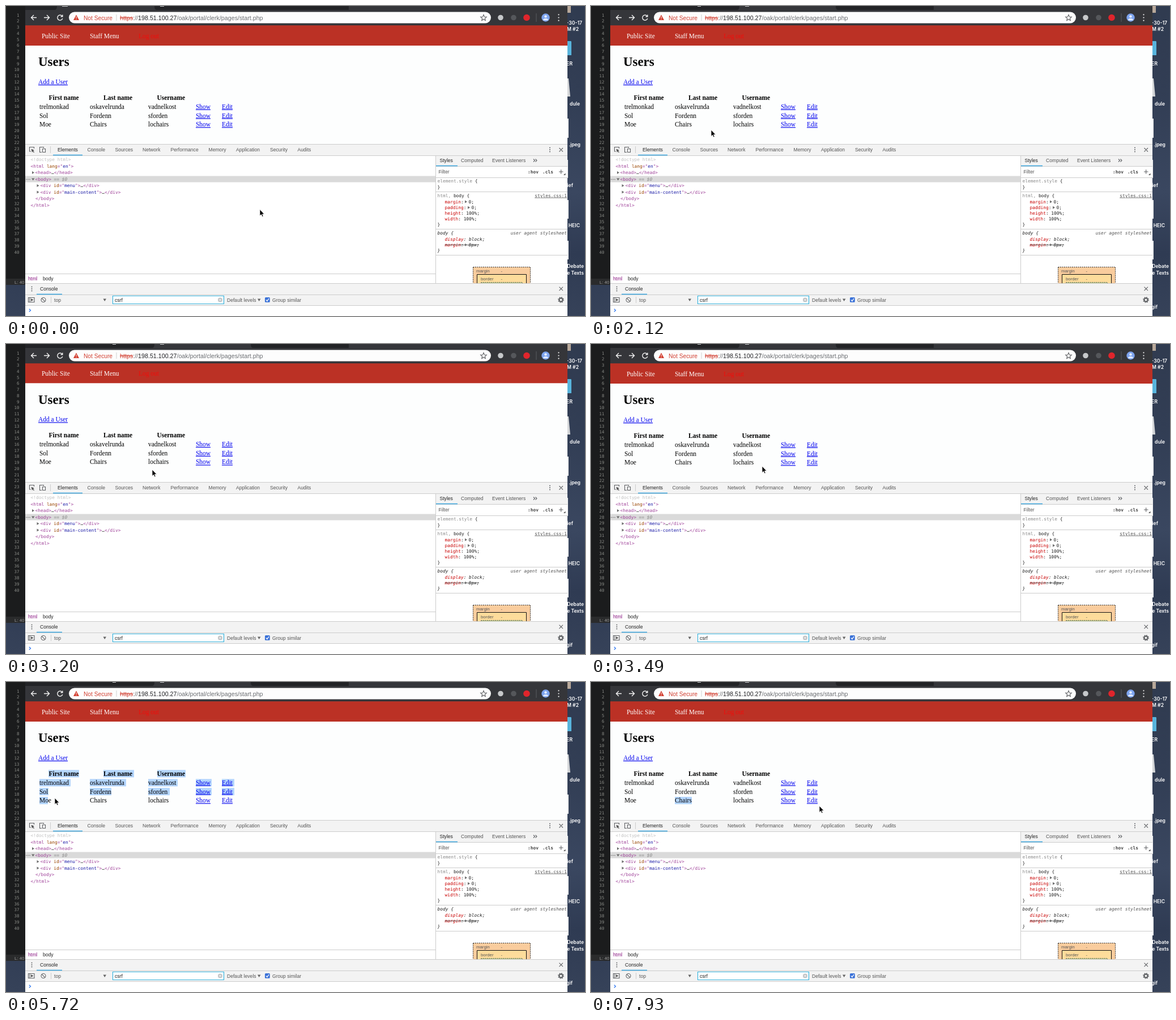
An HTML page for the animation above (8 s loop, 1022x548 px).

```html
<!DOCTYPE html>
<html lang="en">
<head>
<meta charset="utf-8">
<title>Users</title>
<style>
html, body { margin: 0; width: 100%; height: 100%; overflow: hidden; background: #1c1d1f; }
svg { display: block; width: 100vw; height: 100vh; }
text { white-space: pre; }
.ui { font: 8.6px "Liberation Sans", Arial, sans-serif; fill: #555; }
.ui .on { fill: #222; }
.ui .tag { fill: #881280; }
.url { font: 10.7px "Liberation Sans", Arial, sans-serif; fill: #6c6f73; }
.mono { font: 7.86px "DejaVu Sans Mono", monospace; fill: #222; }
.web { font: 11.43px "Liberation Serif", Times, serif; fill: #000; }
.web .link { fill: #00e; text-decoration: underline; }
.web .head { font-weight: bold; }
.gutter { font: 7.4px "DejaVu Sans Mono", monospace; fill: #8b8d88; text-anchor: end; }
.desk { font: 600 8.6px Inter, "Liberation Sans", sans-serif; fill: #fff; text-anchor: end; }
.tag { fill: #a0439a; }
.name { fill: #994500; }
.value { fill: #1a1aa6; }
.prop { fill: #c80000; }
.dim { fill: #888; }
.line { stroke: #ccc; fill: none; }
.icon { stroke: #5f6164; fill: none; stroke-width: 1.1; }
.light { stroke: #f1f1f1; fill: none; stroke-width: 1.4; }
</style>
</head>
<body>
<svg viewBox="0 0 1022 548">
  <defs>
    <linearGradient id="sky" x2="0" y2="1">
      <stop offset="0" stop-color="#303b50"/><stop offset=".3" stop-color="#323e55"/>
      <stop offset=".6" stop-color="#3a4760"/><stop offset=".8" stop-color="#2f3b53"/>
      <stop offset="1" stop-color="#364259"/>
    </linearGradient>
    <clipPath id="view"><path d="M34 34.300H991V244H34Z"/></clipPath>
    <clipPath id="styles"><path d="M759 264H991V490H759Z"/></clipPath>
  </defs>

  <!-- desktop -->
  <rect width="1022" height="548" fill="url(#sky)"/>
  <path d="M985 0H997V12H985Z" fill="#b8a89a"/>
  <path d="M985 62H997Q998 62 998 64V87H985Z" fill="#58b4dc"/>
  <path d="M985 128H993L996 160H985Z" fill="#d4d6d8"/>
  <path d="M985 199H993V233H985ZM985 272H992V304H985ZM985 343H993V376H985ZM985 415H993V448H985Z" fill="#eceeef"/>
  <g id="labels" class="desk"></g>

  <!-- editor -->
  <path d="M0 0H34V493H0Z" fill="#1b1c1d"/>
  <path d="M0 482H34V493H0Z" fill="#2a2b2c"/>
  <g id="gutter" class="gutter"></g>
  <text x="15" y="491" class="ui" style="font-size:7.8px;fill:#999">L: 40</text>

  <!-- browser bar -->
  <path d="M34 0H991V35H34Z" fill="#35363a"/>
  <path d="M34 0H605V7H34Z" fill="#222326"/>
  <path id="tab" fill="#35363a"/>
  <path id="favicons" fill="#c9cbcd"/>
  <path class="light" d="M54 20.500H44.500M49 16L44.500 20.500 49 25M67 20.500H76.500M72 16L76.500 20.500 72 25M99.200 18A4.600 4.600 0 1 0 99.800 22M99.800 15.500V18.800H96.500"/>
  <rect x="111" y="10.500" width="745" height="20" rx="10" fill="#fdfdfd"/>
  <path d="M124 15.500L129 25H119Z" fill="#d23f31"/>
  <path d="M124 18.500V21.800M124 22.800V24" stroke="#fff"/>
  <text x="137" y="24.500" class="url" style="font-size:10.2px;fill:#d23f31">Not Secure</text>
  <path d="M195 15V26" stroke="#d0d0d0"/>
  <text x="201" y="24.500" class="url"><tspan fill="#d23f31" text-decoration="line-through">https</tspan>://<tspan fill="#202124">198.51.100.27</tspan>/oak/portal/clerk/pages/start.php</text>
  <path class="icon" d="M843 15.500L844.500 19 848.300 19.300 845.400 21.800 846.300 25.500 843 23.500 839.700 25.500 840.600 21.800 837.700 19.300 841.500 19Z"/>
  <circle cx="873" cy="20.500" r="4.800" fill="#c6c8ca"/>
  <circle cx="896" cy="20.500" r="4.800" fill="#55575b"/>
  <circle cx="919" cy="20.500" r="5.800" fill="#e0252c"/>
  <path d="M936 13V28" stroke="#5b5d61"/>
  <circle cx="952.500" cy="20.500" r="7.200" fill="#7ea4ee"/>
  <circle cx="952.500" cy="18.500" r="2.300" fill="#e4edff"/>
  <path d="M948 25.200Q948 22 952.500 22T957 25.200Z" fill="#e4edff"/>
  <path d="M975.500 15.300h.01M975.500 20.500h.01M975.500 25.700h.01" stroke="#f1f1f1" stroke-width="2.200" stroke-linecap="round"/>

  <!-- page -->
  <path d="M34 35H991V244H34Z" fill="#fdfefe"/>
  <g clip-path="url(#view)">
    <g id="page" class="web">
      <path d="M34 34H991V70H34Z" fill="#bb3125"/>
      <g fill="#fff"><text x="63" y="57">Public Site</text><text x="148" y="57">Staff Menu</text></g>
      <text x="234" y="57" fill="#f00d0b">Log out</text>
      <text x="57" y="106.300" class="head" font-size="22.860">Users</text>
      <text x="57" y="138" class="link">Add a User</text>
      <path id="selection" fill="#b3d5fd"/>
      <g id="table"></g>
    </g>
  </g>

  <!-- inspector -->
  <path d="M34 244H991V548H34Z" fill="#fff"/>
  <path d="M34 244H991V264H34ZM759 264H991V283H759ZM34 490H991V529H34Z" fill="#f3f3f3"/>
  <path d="M34 300.500H758V311.500H34Z" fill="#dadada"/>
  <path class="line" d="M34 244.500H991M34 264.500H991M758.500 264V490M759 283.500H991M759 303.500H991M759 328.500H991M759 394.500H991M759 440.500H991M34 473.500H758M34 490.500H991M34 510.500H991M34 529.500H991M78.500 248V260M79.500 514V525"/>
  <path d="M83 263.500H135M759 282.500H797M54 509.500H99" stroke="#3ba7e0" stroke-width="1.400"/>
  <path class="icon" d="M44 257H41.500V249.500H49.500V252M63 258.500H59.500V249.500H66.500V251M64.500 252.500H69.500V258.500H64.500Z"/>
  <path d="M44.500 252.500L50 255 48 256 50 258.500 49 259.300 47 257 46 259Z" fill="#555"/>
  <path d="M960 250.500h.01M960 254h.01M960 257.500h.01M45.500 496.500h.01M45.500 500h.01M45.500 503.500h.01" stroke="#5f6164" stroke-width="2" stroke-linecap="round"/>
  <path class="icon" d="M976.500 251L983 257.500M983 251L976.500 257.500M976.500 496.700L983 503.200M983 496.700L976.500 503.200M931 270.500L933.500 273 931 275.500M934.500 270.500L937 273 934.500 275.500M976 293H983.500M979.700 289.200V296.700"/>
  <path d="M987.500 295.500V299H984Z" fill="#555"/>

  <g class="mono">
    <text x="43.500" y="274.200" fill="#c0c0c0">&lt;!doctype html&gt;</text>
    <text x="43.500" y="285.700" class="tag">&lt;html <tspan class="name">lang</tspan>="<tspan class="value">en</tspan>"&gt;</text>
    <text x="51.500" y="297.200" class="tag">&lt;head&gt;<tspan fill="#222">…</tspan>&lt;/head&gt;</text>
    <text x="51.500" y="308.700" class="tag">&lt;body&gt;<tspan class="dim" font-style="italic"> == $0</tspan></text>
    <text x="60.500" y="320.200" class="tag">&lt;div <tspan class="name">id</tspan>="<tspan class="value">menu</tspan>"&gt;<tspan fill="#222">…</tspan>&lt;/div&gt;</text>
    <text x="60.500" y="331.700" class="tag">&lt;div <tspan class="name">id</tspan>="<tspan class="value">main-content</tspan>"&gt;<tspan fill="#222">…</tspan>&lt;/div&gt;</text>
    <text x="52" y="343.200" class="tag">&lt;/body&gt;</text>
    <text x="43.500" y="354.700" class="tag">&lt;/html&gt;</text>
    <path d="M46 292L50 294.500 46 297ZM45 304.500H50.500L47.700 308.500ZM54.500 315L58.500 317.500 54.500 320ZM54.500 326.500L58.500 329 54.500 331.500Z" fill="#6e6e6e"/>
    <path d="M36 306.500h.01M39 306.500h.01M42 306.500h.01" stroke="#666" stroke-width="1.500" stroke-linecap="round"/>
  </g>

  <g class="mono" clip-path="url(#styles)">
    <text x="921" y="295.700" font-weight="bold" fill="#444">:hov</text>
    <text x="947" y="295.700" font-weight="bold" fill="#444">.cls</text>
    <text x="761.500" y="311.500"><tspan class="dim">element.style</tspan> {</text>
    <text x="761.500" y="322.500">}</text>
    <text x="761.500" y="337.700"><tspan class="dim">html, </tspan>body {</text>
    <text x="990" y="337.700" text-anchor="end" fill="#555" text-decoration="underline">styles.css:1</text>
    <text x="774.500" y="348.500"><tspan class="prop">margin</tspan>:<tspan x="816.500">0;</tspan></text>
    <text x="774.500" y="358.700"><tspan class="prop">padding</tspan>:<tspan x="821.500">0;</tspan></text>
    <text x="774.500" y="368.900"><tspan class="prop">height</tspan>: 100%;</text>
    <text x="774.500" y="379.100"><tspan class="prop">width</tspan>: 100%;</text>
    <text x="761.500" y="388.700">}</text>
    <g font-style="italic">
      <text x="761.500" y="403.500">body {</text>
      <text x="990" y="403.500" text-anchor="end" fill="#555">user agent stylesheet</text>
      <text x="774.500" y="414.700"><tspan class="prop">display</tspan>: block;</text>
      <text x="774.500" y="424.900"><tspan class="prop">margin</tspan>:<tspan x="816.500">8px;</tspan></text>
      <text x="761.500" y="435">}</text>
    </g>
    <path d="M774.500 422.300H835" stroke="#444" stroke-width=".8"/>
    <path d="M810 343.500L814 346 810 348.500ZM815 353.700L819 356.200 815 358.700ZM810 419.700L814 422.200 810 424.700Z" fill="#6e6e6e"/>
    <path d="M824.500 461.500H925.500V500H824.500Z" fill="#f9cc9d" stroke="#222" stroke-dasharray="2 1.500"/>
    <path d="M831.500 474.500H918.500V500H831.500Z" fill="#fddc9b" stroke="#111"/>
    <path d="M838.500 488.500H911.500V500H838.500Z" fill="#c2d08a" stroke="#666" stroke-dasharray="2 1.500"/>
    <g class="ui" style="font-size:7.8px"><text x="830" y="470.700">margin</text><text x="873.500" y="470.700">-</text><text x="838" y="484.700">border</text><text x="873.500" y="484.700">-</text></g>
  </g>

  <!-- console -->
  <path class="icon" d="M39.500 515.500H50V523.500H39.500ZM42 515.500V523.500"/>
  <path d="M44 517L48.500 519.500 44 522Z" fill="#555"/>
  <path class="icon" d="M62 519.500a4 4 0 1 0 8 0a4 4 0 1 0 -8 0M63.200 516.700L68.800 522.300"/>
  <path d="M171.500 517.500H177L174.200 522ZM444 517.500H449.500L446.700 522Z" fill="#666"/>
  <path d="M188.500 512.500H384.500V526.500H188.500Z" fill="#fff" stroke="#36b2dc" stroke-width="1.200"/>
  <circle cx="378" cy="519.500" r="4" fill="#c4c6c8"/>
  <path d="M376.500 518L379.500 521M379.500 518L376.500 521" stroke="#fff"/>
  <rect x="457" y="515" width="8.800" height="8.800" rx="1.500" fill="#3b72d8"/>
  <path d="M459 519.500L461 521.600 464 517" fill="none" stroke="#fff" stroke-width="1.300"/>
  <circle cx="979.500" cy="519.500" r="3.100" fill="none" stroke="#5f6164" stroke-width="2.200"/>
  <circle cx="979.500" cy="519.500" r="4.700" fill="none" stroke="#5f6164" stroke-width="1.300" stroke-dasharray="1.846"/>
  <path d="M40.800 535.500L43.500 538 40.800 540.500" fill="none" stroke="#367cf1" stroke-width="1.300"/>
  <g id="captions" class="ui"></g>

  <path id="arrow" d="M0 0V11.500L2.600 9.100 4.300 13 6.200 12.200 4.500 8.400H8Z" fill="#000" stroke="#fff" stroke-width=".8"/>
  <path id="beam" d="M-3 -8Q0 -8 0 -6Q0 -8 3 -8M0 -6V6M-3 8Q0 8 0 6Q0 8 3 8" fill="none" stroke="#111"/>
</svg>
<script>
const $ = id => document.getElementById(id);
const columns = [59, 148, 251, 335, 381];
const rows = [181.7, 197.5, 213.2];
const cssPixel = 5 / 7;

function label(parent, x, y, content, className = "") {
  const node = document.createElementNS("http://www.w3.org/2000/svg", "text");
  node.setAttribute("x", x);
  node.setAttribute("y", y);
  node.setAttribute("class", className);
  node.textContent = content;
  return $(parent).appendChild(node);
}

for (let n = 1; n <= 40; n++) label("gutter", 23.5, 8 + n * 10.74, n);

[[1017, 33, "-30-17"], [1011, 44, "M #2"], [1000, 105, "ER"], [1013, 176, "dule"],
 [1014, 248, ".jpeg"], [1001, 320, "ief"], [1013, 391, "HEIC"], [1020, 463, "Debate"],
 [1020, 475, "e Texts"]].forEach(item => label("labels", ...item));
const newFile = label("labels", 1000, 535, "gif");

[[75.5, "First name"], [172, "Last name"], [266.5, "Username"]]
  .forEach(([x, title]) => label("table", x, 165.8, title, "head"));
[["trelmonkad", "oskavelrunda", "vadnelkost"], ["Sol", "Fordenn", "sforden"], ["Moe", "Chairs", "lochairs"]]
  .forEach((cells, r) => [...cells, "Show", "Edit"].forEach((cell, c) =>
    label("table", columns[c], rows[r], cell, c > 2 ? "link" : "")));

[[91, "Elements", "on"], [143.5, "Console"], [192.5, "Sources"], [241, "Network"], [290.5, "Performance"],
 [357.5, "Memory"], [406, "Application"], [466, "Security"], [514.5, "Audits"]]
  .forEach(([x, title, state]) => label("captions", x, 257, title, state));
[[765.5, 276.2, "Styles", "on"], [803, 276.2, "Computed"], [858, 276.2, "Event Listeners"],
 [763.5, 296, "Filter"], [39, 485, "html", "tag"], [65, 485, "body", "on"], [60, 503, "Console", "on"],
 [85, 522.6, "top"], [192, 522.6, "csrf", "on"], [390, 522.6, "Default levels"],
 [470, 522.6, "Group similar"]].forEach(item => label("captions", ...item));

// Pointer poses: time, x, y; each one holds until the next.
const poses = [
  [0, 448, 359.5], [150, 400, 322], [310, 330, 280], [470, 265, 236], [630, 228, 205], [790, 213, 193],
  [1090, 218, 188], [1240, 228, 180], [1390, 237, 173], [1540, 242.5, 166.5], [1680, 240, 180],
  [1830, 232, 196], [1970, 222, 209], [2120, 212, 219], [2400, 204, 225], [2600, 197, 229],
  [2760, 193.5, 231], [2900, 203, 229], [3050, 228, 226], [3200, 258, 222], [3350, 286, 218],
  [3490, 302, 216], [3940, 301, 219], [4390, 301, 221], [4540, 240, 223], [4690, 155, 224],
  [4840, 92, 222], [4990, 60.5, 218], [5130, 54, 214], [5280, 51, 210], [5430, 54, 207],
  [5580, 60, 205], [5720, 86, 205], [5870, 101, 206], [6010, 117, 207], [6160, 131, 208],
  [6300, 143, 208], [6450, 155, 206], [6750, 159, 206], [6900, 162, 205], [7040, 163.5, 204.5],
  [7930, 403, 219]
];

const block = (x, right, y) => `M${x} ${y}H${right}V${y + 13}H${x}Z`;

function selectionPath(t) {
  if (t >= 7330) return block(148, 178, 203);
  if (t < 5720 || t >= 6750) return "";
  const full = [[75, 129], [172, 226], [267, 317]].map(([a, b]) => block(a, b, 155.5));
  const ends = [[114, 212, 303, 363, 403], [75, 186, 289, 363, 403]];
  ends.forEach((list, r) => list.forEach((end, c) => full.push(block(columns[c], end, 171.5 + r * 15.7))));
  full.push(block(59, t < 5870 ? 74 : 82, 203));
  if (t >= 6450) full.push(block(148, 156, 203));
  return full.join("");
}

function draw(t) {
  const [, x, y] = poses.findLast(pose => pose[0] <= t);
  const overText = t >= 6450 && t < 7930;
  $("arrow").setAttribute("transform", `translate(${x} ${y})`);
  $("beam").setAttribute("transform", `translate(${x} ${y})`);
  $("arrow").style.display = overText ? "none" : "";
  $("beam").style.display = overText ? "" : "none";
  const scrolled = t >= 2400 && t < 3490;
  $("page").setAttribute("transform", `translate(0 ${scrolled ? -cssPixel : 0})`);
  $("selection").setAttribute("d", selectionPath(t));

  const later = t >= 1680;
  newFile.style.display = later ? "" : "none";
  $("tab").setAttribute("d", later ? "M258 7Q262 7 262 0H432Q432 7 436 7Z" : "M86 7Q90 7 90 0H262Q262 7 266 7Z");
  $("favicons").setAttribute("d", later ? "M188 0h6v1h-6ZM272 0h7v1h-7Z" : "M99 0h10v1h-10ZM272 0h7v1h-7Z");
}

function tick() {
  draw(performance.now() % 8000);
  requestAnimationFrame(tick);
}
tick();
</script>
</body>
</html>
```
